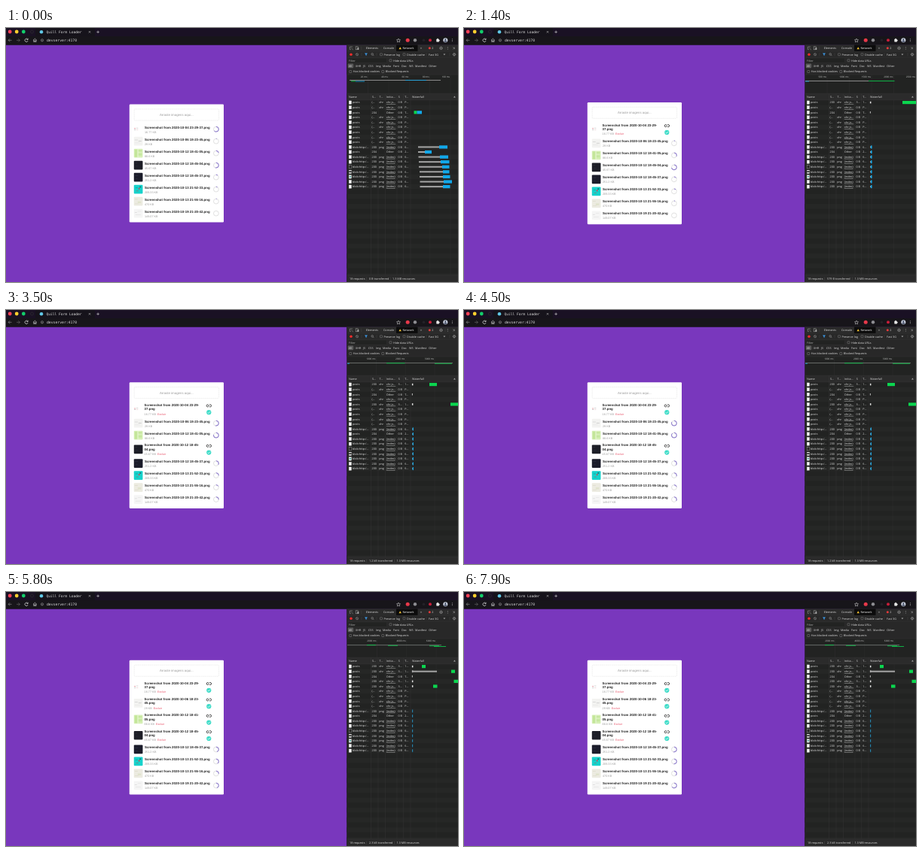
Recreate the animation shown at these times as an HTML page. Size 600 px wide and 338 px high, loop 8000 ms.

```html
<!DOCTYPE html>
<html lang="pt">
<head>
<meta charset="utf-8">
<title>Upload</title>
<style>
html, body { margin: 0; width: 100%; height: 100%; overflow: hidden; background: #7937bd; }
svg { display: block; width: 100vw; height: 100vh; }
text { text-rendering: geometricPrecision; white-space: pre; font-family: "Open Sans", sans-serif; }
.page text { font-family: "Liberation Sans", Arial, sans-serif; }
.mono { font-family: "DejaVu Sans Mono", monospace !important; }
</style>
</head>
<body>
<svg id="stage" viewBox="0 0 600 338" preserveAspectRatio="none"></svg>
<script>
const LOOP = 8000;
const STATE_STARTS = [0, 1400, 3200, 5700];
const BURSTS = [500, 1400, 2500, 3200, 4200, 4800, 5700, 6500, 7300];
const BURST_MS = 600;

// name, time split at the wrap point, size, state in which it is done, progress per burst
const FILES = [
  ['2020-10-04 23-29-', '37', '16.77 KB', 1, [64, 100]],
  ['2020-10-06 18-23-', '45', '29 KB', 3, [4, 6, 9, 14, 68, 88, 100]],
  ['2020-10-12 18-41-', '05', '88.6 KB', 3, [22, 32, 46, 70, 82, 90, 100]],
  ['2020-10-12 18-45-', '04', '45.67 KB', 2, [55, 72, 82, 96]],
  ['2020-10-12 18-45-', '37', '251.2 KB', 9, [10, 15, 22, 30, 35, 39, 44, 46, 50, 55]],
  ['2020-10-13 21-52-', '33', '209.33 KB', 9, [8, 12, 17, 23, 27, 32, 39, 42, 47, 52]],
  ['2020-10-13 21-55-', '16', '470 KB', 9, [4, 6, 9, 14, 18, 22, 27, 30, 35, 40]],
  ['2020-10-19 21-20-', '42', '149.07 KB', 9, [0, 0, 3, 12, 30, 36, 42, 52, 58, 66]]
];

const GREY = '#a5a5a5', GREEN = '#0bd64f', BLUE = '#12a8ea', TEXT = '#dedede';

const rect = (x, y, w, h, fill, more = '') =>
  `<rect x="${x}" y="${y}" width="${w}" height="${h}" fill="${fill}" ${more}/>`;
const disc = (x, y, r, fill, more = '') =>
  `<circle cx="${x}" cy="${y}" r="${r}" fill="${fill}" ${more}/>`;
const line = (d, color, w = .6, more = '') =>
  `<path d="${d}" fill="none" stroke="${color}" stroke-width="${w}" ${more}/>`;
// y is the middle of the text line
const text = (x, y, str, fill = TEXT, size = 3.75, more = '') =>
  `<text x="${x}" y="${y + size * .35}" font-size="${size}" fill="${fill}" ${more}>${str}</text>`;
const box = (x, y) => rect(x - 1.5, y - 1.5, 3, 3, 'none', 'stroke="#999" stroke-width=".4" rx=".4"');
const gear = (x, y) => disc(x, y, 1.3, 'none', 'stroke="#aaa" stroke-width=".7"') +
  disc(x, y, 2, 'none', 'stroke="#aaa" stroke-width=".5" stroke-dasharray=".8 .77"');
const dots = (x, y, color) => [-1.5, 0, 1.5].map(d => disc(x, y + d, .45, color)).join('');
const cross = (x, y, s, color) =>
  line(`M${x - s} ${y - s}l${2 * s} ${2 * s}m0 ${-2 * s}l${-2 * s} ${2 * s}`, color);

function browserBar() {
  const white = '#e6e6e6';
  return rect(0, 0, 600, 22.5, '#1a1124') + rect(39, 0, 79, 11, '#16131b', 'rx="1.5"') +
    rect(0, 11, 600, 11.5, '#17151a') +
    disc(5.2, 5, 2.4, '#ff4158') + disc(14.2, 5, 2.4, '#ffd02e') + disc(23.3, 5, 2.4, '#12cf6b') +
    disc(34.5, 5, 2, 'none', 'stroke="#333" stroke-width=".6"') +
    disc(47, 5.2, 2.3, '#61c9e8') +
    text(53.5, 5.3, 'Quill Form Loader', '#dcdcdc', 4.6, 'class="mono"') +
    cross(111, 5.3, 1.2, '#bbb') + line('M120.3 5.3h3.6m-1.8-1.8v3.6', '#ddd') +
    line('M7.5 16.3h-4.4m2-2l-2 2l2 2', '#888', .7) +
    line('M14 16.3h4.4m-2-2l2 2l-2 2', '#666', .7) +
    line('M28.9 15.2a2.1 2.1 0 1 0 .2 1.8m0-3.2v1.7h-1.7', white, .7) +
    line('M36 16.4l2.4-2.2l2.4 2.2m-4-.6v2.6h1.1v-1.5h1v1.5h1.1v-2.6', white, .6) +
    disc(48, 16.3, 1.6, 'none', 'stroke="#bbb" stroke-width=".5"') + line('M48 16v1.2', '#bbb', .5) +
    text(54, 16.3, 'devserver:4170', '#dcdcdc', 4.75, 'class="mono"') +
    line('M521 14l.7 1.6 1.8.2-1.3 1.2.4 1.8-1.6-.9-1.6.9.4-1.8-1.3-1.2 1.8-.2z', white, .5) +
    disc(533.2, 16.3, 2.5, '#e8394a') + disc(543, 16.3, 2.2, '#8d8d92') +
    disc(554.5, 16.3, 1.8, '#242228') + disc(563, 16.3, 2, '#c81e3a') +
    rect(571.3, 14.8, 3.6, 3.6, white, 'rx=".4"') + disc(573, 14.6, .8, white) + disc(575, 16.6, .8, white) +
    disc(583.3, 16.3, 3, '#cfd5e2') + disc(583.3, 15.3, 1.1, '#39435c') +
    `<path d="M581.2 18.4a2.1 2 0 0 1 4.2 0z" fill="#39435c"/>` + dots(592.3, 16.3, white);
}

function devtoolsFrame() {
  let s = rect(452.5, 22.5, 147.5, 315.5, '#222322') + rect(452.5, 22.5, 147.5, 8.8, '#2b2b2b') +
    rect(518, 22.5, 28.5, 8.8, '#0c0c0c') + rect(452.5, 31.3, 147.5, 30.6, '#282828') +
    line('M452.5 31.2h147.5M452.5 39h147.5M452.5 62h147.5', '#3c3c3c', .35);
  s += line('M460 25h-3.6v3.6h1.4m.6-1.8l2.4 2.2', '#aaa', .5) +
    rect(464.2, 24.8, 3, 4, 'none', 'stroke="#aaa" stroke-width=".5"') + rect(466.4, 26.2, 1.9, 2.8, '#aaa') +
    line('M471.8 24.5v5M583 24.5v5', '#555', .3) +
    text(477.8, 26.8, 'Elements') + text(501, 26.8, 'Console') +
    `<path d="M521.5 28.3l1.7-3.1 1.7 3.1z" fill="#f3c22f"/>` + text(526.5, 26.8, 'Network', '#fff') +
    text(549.8, 26.6, '»', '#bbb', 4.6) + disc(562.3, 26.8, 1.5, '#ee3b3b') + text(565.3, 26.8, '2') +
    gear(577.5, 26.8) + dots(586.2, 26.8, '#aaa') + cross(594.7, 26.8, 1.3, '#aaa');
  s += disc(458, 35.2, 1.8, '#ee2c2c') + disc(466, 35.2, 1.6, 'none', 'stroke="#999" stroke-width=".5"') +
    line('M464.9 34.1l2.2 2.2', '#999', .5) + line('M472 33v4.4M492 33v4.4M558 33v4.4M589 33v4.4', '#555', .3) +
    `<path d="M476 33.6h4l-1.5 1.8v1.7l-1-.6v-1.1z" fill="#3d9bea"/>` +
    disc(486.2, 34.8, 1.3, 'none', 'stroke="#aaa" stroke-width=".5"') + line('M487.1 35.7l1.3 1.3', '#aaa', .5) +
    box(498, 35.2) + text(501.5, 35.2, 'Preserve log') + box(528.5, 35.2) + text(532, 35.2, 'Disable cache') +
    text(561, 35.2, 'Fast 3G') + `<path d="M580.5 34.4h2.8l-1.4 1.8z" fill="#aaa"/>` + gear(595, 35.2);
  s += rect(453.5, 40, 52, 6.3, '#222322', 'stroke="#383838" stroke-width=".3"') +
    text(455, 43.2, 'Filter', '#aaa') + box(510.5, 43.2) + text(514, 43.2, 'Hide data URLs') +
    rect(453.8, 47.5, 7.4, 5.8, '#5a5a5a', 'rx="1"') + line('M462.6 48.5v4', '#555', .3);
  [['All', 455], ['XHR', 464], ['JS', 474], ['CSS', 481], ['Img', 491], ['Media', 500], ['Font', 514],
   ['Doc', 525], ['WS', 535], ['Manifest', 543], ['Other', 561.3]].forEach(([t, x]) => s += text(x, 50.4, t));
  s += box(457.3, 58) + text(460.8, 58, 'Has blocked cookies') + box(500.3, 58) + text(503.8, 58, 'Blocked Requests');
  s += rect(452.5, 87.5, 147.5, 8.3, '#2b2b2b') + line('M452.5 87.3h147.5M452.5 95.8h147.5', '#404040', .35);
  for (let y = 102.4; y < 328; y += 13.18) s += rect(452.5, y, 147.5, Math.min(6.59, 328.7 - y), '#262726');
  s += line('M484.5 87.5v241M494 87.5v241M503.5 87.5v241M519 87.5v241M527.5 87.5v241M537 87.5v241', '#3c3c3c', .35);
  [['Name', 455], ['S…', 486], ['T…', 495.5], ['Initia…', 505], ['S', 520.8], ['T…', 529.3], ['Waterfall', 539]]
    .forEach(([t, x]) => s += text(x, 91.7, t));
  return s + `<path d="M594 92.6h2.8l-1.4-2z" fill="#aaa"/>` +
    rect(452.5, 328.7, 147.5, 9.3, '#2a2a2a') + line('M452.5 328.7h147.5', '#404040', .35) +
    line('M452.5 22.5V338', '#1a1a1a', .5) + text(456, 333.6, '18 requests');
}

// ruler: first grid line, spacing, first value, step; spans: x1, x2, y, colour; bars: row, x1, x2, colour
const NET = [
  { ruler: [480.5, 27.4, 20, 20], done: [], sent: '0 B', resX: 513,
    spans: [[456, 577, 69.6, GREY], [458, 464, 70.8, GREEN], [464, 476, 71, BLUE], [530, 558, 69.6, BLUE]],
    bars: [[2, 541.5, 545.5, GREEN], [2, 545.5, 552, BLUE],
      ...[[9, 547, 575, 586], [10, 547, 556, 565], [11, 547.5, 576, 587], [12, 548, 577, 588.5], [13, 548, 579, 588.5],
        [14, 549, 580, 588.5], [15, 549, 580, 589.5], [16, 549.5, 581, 592], [17, 549.5, 580, 589.5]]
        .flatMap(([r, a, b, c]) => [[r, a, b, GREY], [r, b, c, BLUE]])] },
  { ruler: [482, 29.5, 500, 500], done: [0], sent: '579 B', resX: 518.5, ticks: 1.6,
    spans: [[453, 537, 70.4, GREY], [453, 458, 71, BLUE], [537, 571.5, 70.6, GREEN]],
    bars: [[0, 582, 600, GREEN]] },
  { ruler: [491.5, 38.8, 1000, 1000], done: [0, 4], sent: '1.2 kB', resX: 518.5, ticks: 1.2,
    spans: [[453, 593, 70.6, '#777d79'], [453, 456, 71.2, BLUE], [505, 529.5, 70.8, GREEN], [569, 592, 71.2, GREEN]],
    bars: [[0, 562, 572, GREEN], [4, 590, 600, GREEN]] },
  { ruler: [492.5, 39.3, 2000, 2000], done: [0, 1, 3, 4], sent: '2.3 kB', resX: 518.5, ticks: .7,
    spans: [[453, 578, 70.7, '#777d79'], [479, 491, 70.7, GREEN], [507, 520, 71.2, GREEN],
      [562, 575, 71.8, GREEN], [568, 584, 72.6, GREEN]],
    bars: [[0, 552, 557, GREEN], [1, 539, 572, GREY], [1, 591, 596, GREEN], [3, 594.5, 600, GREEN], [4, 567, 572.5, GREEN]] }
];

function network({ ruler: [x0, dx, v0, dv], done, sent, resX, spans, bars, ticks }) {
  let s = '';
  for (let i = 0; x0 + i * dx < 603; i++) {
    const x = x0 + i * dx;
    s += line(`M${x} 62v25`, '#363636', .35) +
      text(x - 1, 65.2, `${v0 + i * dv} ms`, '#ccc', 3.1, 'text-anchor="end"');
    if (x > 540) s += line(`M${x} 96v232.5`, '#363636', .35);
  }
  spans.forEach(([a, b, y, c]) => s += rect(a, y - .4, b - a, .8, c));
  for (let i = 0; i < 18; i++) {
    const y = 99.1 + i * 6.59, blob = i === 9 || i > 10, other = i === 2 || i === 10, ok = done.includes(i);
    s += rect(455.2, y - 2.2, 3.4, 4.4, i === 13 ? '#222' : '#f2f2f2', 'stroke="#ddd" stroke-width=".3"');
    if (i === 14) s += rect(455.2, y - 1, 3.4, 1.8, '#222');
    if (i === 15) s += rect(455.8, y - 1, 2.2, 1.8, '#5aa9a2');
    s += text(460, y, blob ? 'blob:http:/…' : 'posts') +
      text(485.5, y, blob || ok ? '200' : other ? '204' : '(…') +
      text(495.2, y, blob ? 'png' : other ? '' : 'xhr') +
      text(504.8, y, blob ? '(index)' : other ? 'Other' : 'xhr.js…', TEXT, 3.75, other ? '' : 'text-decoration="underline"') +
      text(520.5, y, ok ? '3…' : '0 B') +
      text(529.3, y, blob ? '6…' : i === 10 ? '2…' : other ? 'T…' : ok ? '1…' : 'P…');
    if (!ticks) continue;
    if (blob || i === 10) s += rect(539, y - 1, ticks * .6, 2, GREY) + rect(539 + ticks * .6, y - 2, ticks, 4, BLUE);
    else if (other || ok) s += rect(538.9, y - 1.3, ok ? 1.5 : .8, 2.6, '#e4e4e4');
  }
  bars.forEach(([r, a, b, c]) => {
    const h = c === GREY ? 2 : 4.2;
    s += rect(a, 99.1 + r * 6.59 - h / 2, b - a, h, c);
  });
  return s + text(482, 333.6, sent + ' transferred') + text(resX, 333.6, '1.3 MB resources') +
    line(`M478.5 331.5v4.4M${resX - 3} 331.5v4.4`, '#555', .35);
}

// each picture is a square: background, then x, y, w, h, colour
const THUMBS = [
  ['#fff', [.5, -1.4, 1.6, .8, '#d9707e'], [3, -1.8, 2.6, .4, '#999'], [.5, .4, 1.8, .5, '#888'], [3.2, .6, 2.4, .4, '#dba6ac']],
  ['#f3f3f1', [1, -2, 4, .6, '#c9c9c9'], [6, -.5, 4, .6, '#bbb'], [1, 2, 7, .4, '#ddd']],
  ['#d6efb6', [1, -5, 3.6, 10, '#c3e69a'], [4.9, -5.6, .7, 11.2, '#eef8e0'], [6, -4, 4.6, 1.4, '#bfe394'], [6, 0, 4.6, 3, '#c6e89f']],
  ['#1d1e27', [1.5, -3, 3, .4, '#3a3c4a'], [2, 1, 4, .4, '#33354a']],
  ['#1b1c2a', [1.5, -2.5, 4, .4, '#3a3c55'], [2, 1.5, 3, .4, '#34364d']],
  ['#16d2cb', [2, -2.6, 3, 1, '#12aaa9'], [6, -2, 1.8, 2, '#c2505a'], [3, 1.6, 3, 1, '#6a8d8c'], [7.6, -4, 1.8, 1.6, '#17616d']],
  ['#ecebe1', [1, -3, 4, .5, '#d3d1bf'], [5, 0, 4.5, 2.5, '#e0e3cd'], [1, 3, 5, .5, '#d6d4c5']],
  ['#f5f5f5', [1, -1.5, 3, .6, '#d0d0d0'], [5, -3, 4.5, .5, '#ddd'], [2, 1.8, 7, .5, '#d8d8d8']]
];

function thumb(i, cy) {
  const [bg, ...parts] = THUMBS[i];
  return rect(169.8, cy - 5.9, 11.7, 11.7, bg, 'rx="1"') +
    parts.map(([x, y, w, h, c]) => rect(169.8 + x, cy + y, w, h, c)).join('');
}

function card(state) {
  const grown = FILES.filter(f => f[3] <= state).length;
  const h = 157 + 5.4 * grown, top = 180.1 - h / 2;
  let s = rect(163.8, top, 125.2, h, '#fff', 'rx="1.25"') +
    rect(170.2, top + 6.3, 112.4, 15.1, 'none', 'rx="1.2" stroke="#ccc" stroke-width=".35" stroke-dasharray="1 .6"') +
    text(226.3, top + 13.9, 'Arraste imagens aqui...', '#999', 4.375, 'text-anchor="middle"');
  let y = top + 27.45;
  FILES.forEach(([day, sec, size, doneAt], i) => {
    const done = doneAt <= state, rowH = done ? 16.7 : 11.3, cy = y + rowH / 2;
    const bold = (x, yy, t) => text(x, yy, t, '#222', 4.4, 'font-weight="700"');
    s += thumb(i, cy);
    if (done) {
      s += bold(183.6, cy - 5.5, 'Screenshot from ' + day) + bold(183.6, cy - .4, sec + '.png') +
        text(183.6, cy + 6.2, size + ' <tspan dx=".9" fill="#e8566c">Excluir</tspan>', '#999') +
        line(`M268.7 ${cy - 6.1}h-1a1.5 1.5 0 0 0 0 3h1m1.4-3h1a1.5 1.5 0 0 1 0 3h-1m-2-1.5h1.8`, '#222', .8) +
        disc(269.3, cy + 4.2, 3.1, '#3fdcc8') +
        line(`M267.7 ${cy + 4.3}l1.2 1.2l2.2-2.4`, '#fff', .7);
    } else {
      s += bold(184, cy - 2.6, 'Screenshot from ' + day + sec + '.png') + text(184, cy + 3.6, size, '#999') +
        disc(278.9, cy, 3.375, 'none', 'stroke="#d6d6d6" stroke-width=".75"') +
        line(`M278.9 ${cy - 3.375}a3.375 3.375 0 1 1 0 6.75a3.375 3.375 0 1 1 0 -6.75`, '#6247c0', .75,
          `pathLength="100" data-file="${i}"`);
    }
    y += rowH + 4.7;
  });
  return s;
}

const stage = document.getElementById('stage');
stage.innerHTML = rect(0, 22, 453, 316, '#7937bd') + browserBar() + devtoolsFrame() +
  NET.map((net, i) => `<g class="state">${network(net)}<g class="page">${card(i)}</g></g>`).join('');
const states = [...stage.querySelectorAll('.state')];
const rings = [...stage.querySelectorAll('[data-file]')];

const ease = p => 1 - (1 - p) ** 2;

function progress(values, t) {
  let v = values[0];
  BURSTS.forEach((start, i) => {
    if (i + 1 >= values.length) return;
    const p = Math.min(1, Math.max(0, (t - start) / BURST_MS));
    v += (values[i + 1] - values[i]) * ease(p);
  });
  return v;
}

function draw(now) {
  const t = now % LOOP;
  const current = STATE_STARTS.filter(s => s <= t).length - 1;
  states.forEach((g, i) => g.setAttribute('display', i === current ? 'inline' : 'none'));
  rings.forEach(ring => {
    const v = progress(FILES[ring.dataset.file][4], t);
    ring.setAttribute('stroke-dasharray', `${v} 200`);
  });
}

let origin;
function tick(now) {
  origin ??= now;
  draw(now - origin);
  requestAnimationFrame(tick);
}
draw(0);
requestAnimationFrame(tick);
</script>
</body>
</html>
```
